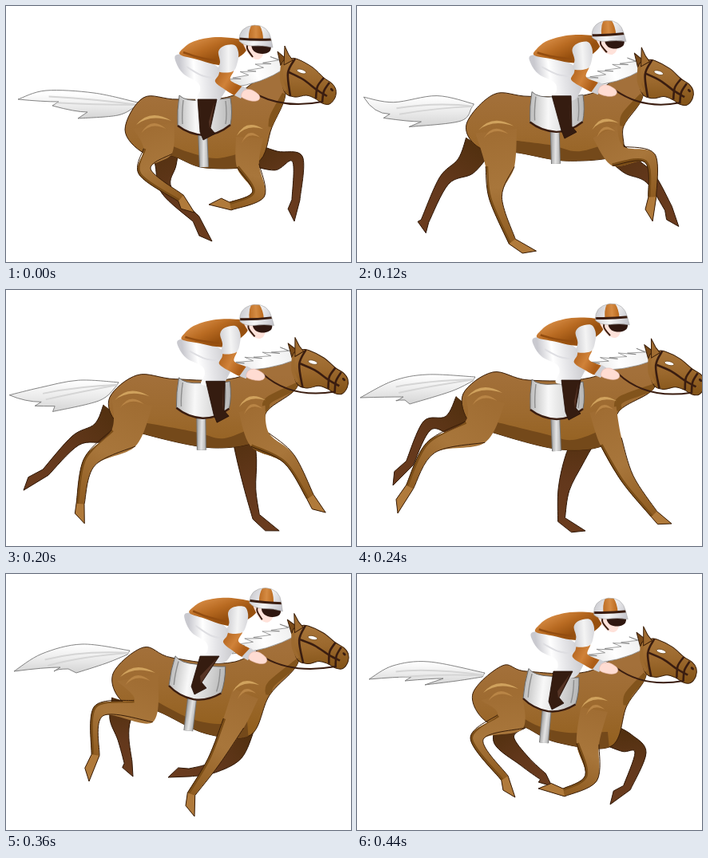
These frames come from a looping animation (432x321 px, 480 ms). An HTML page with a canvas:

```html
<!DOCTYPE html>
<html lang="en">
<head>
<meta charset="utf-8">
<title>Gallop</title>
<style>
html, body { margin: 0; width: 100%; height: 100%; overflow: hidden; background: #fff; }
canvas { display: block; }
</style>
</head>
<body>
<canvas id="stage" width="432" height="321"></canvas>
<script>
const ctx = document.getElementById('stage').getContext('2d');
const STEP = 40, STEPS = 12;
const KEYS = [0, 2, 4, 6, 7, 9, 11];
const INK = '#3a1e08', DARK = '#63381c', STRAP = '#3a1d10';

// One row per key pose, x and y alternating.
// Legs: root, upper joint, hock or knee, fetlock, toe.
const nearHind = [
  [185,150, 190,182, 174,208, 219,241, 236,259],
  [188,165, 203,205, 212,242, 246,293, 276,305],
  [160,145, 153,193, 126,231, 131,286, 155,301],
  [160,135, 148,178, 92,198, 66,247, 51,280],
  [165,130, 150,172, 92,181, 62,231, 43,254],
  [165,130, 172,172, 116,172, 112,227, 104,260],
  [180,150, 192,185, 150,207, 185,256, 198,280]];
const farHind = [
  [200,170, 200,200, 201,231, 238,267, 258,295],
  [168,180, 152,210, 133,227, 137,288, 164,304],
  [140,165, 125,188, 93,207, 48,245, 23,262],
  [138,145, 117,170, 88,170, 66,217, 45,245],
  [148,142, 130,162, 100,161, 84,220, 78,246],
  [150,160, 143,183, 147,207, 153,236, 159,254],
  [195,185, 184,208, 210,235, 233,254, 244,266]];
const nearFore = [
  [305,165, 303,200, 316,236, 281,251, 254,249],
  [312,165, 332,192, 361,202, 353,244, 339,272],
  [308,150, 318,186, 364,190, 377,241, 391,268],
  [308,150, 318,190, 339,237, 372,281, 394,293],
  [305,150, 307,187, 311,236, 313,287, 339,301],
  [300,150, 285,187, 260,235, 232,276, 236,304],
  [297,170, 289,213, 293,256, 259,274, 227,269]];
const farFore = [
  [305,185, 338,194, 365,192, 363,243, 361,270],
  [322,170, 347,186, 376,188, 400,235, 406,258],
  [305,180, 328,214, 347,246, 362,275, 382,297],
  [288,180, 272,213, 259,250, 256,288, 286,302],
  [280,185, 250,221, 225,261, 204,280, 194,301],
  [298,190, 285,224, 258,243, 230,249, 203,255],
  [312,200, 338,212, 355,224, 338,268, 317,289]];
// Withers, chest, brisket, belly, flank, lower and upper buttock, croup, back.
const trunk = [
  [285,112, 333,152, 314,197, 250,203, 208,188, 172,184, 149,155, 172,115, 215,117],
  [300,110, 340,150, 330,190, 265,195, 217,185, 168,187, 146,155, 180,112, 222,117],
  [285,110, 327,152, 324,184, 260,195, 185,183, 140,168, 129,140, 163,109, 210,110],
  [292,110, 328,152, 314,192, 255,200, 168,178, 140,165, 133,130, 170,103, 215,113],
  [298,106, 330,148, 308,197, 240,194, 172,172, 140,163, 133,125, 178,95, 210,105],
  [287,110, 330,152, 306,202, 250,200, 190,172, 146,160, 134,125, 172,92, 208,105],
  [290,122, 338,165, 318,216, 250,211, 205,190, 162,185, 145,150, 182,115, 212,122]];
// Tip, two points on top, root, lower bulge, lobe, notch, second lobe.
const tail = [
  [15,117, 50,106, 110,109, 165,121, 140,137, 90,141, 102,133, 58,125],
  [12,106, 50,112, 105,107, 158,123, 140,139, 78,143, 95,138, 47,131],
  [5,125, 42,127, 95,117, 137,121, 118,147, 55,158, 66,150, 24,148],
  [4,135, 45,114, 88,106, 148,109, 118,127, 66,143, 60,138, 50,139],
  [2,126, 50,106, 95,96, 148,101, 118,117, 70,134, 62,130, 36,132],
  [10,122, 45,100, 95,88, 155,96, 125,112, 88,124, 78,119, 60,122],
  [15,132, 45,115, 90,110, 160,124, 125,134, 85,139, 108,131, 60,134]];
// Rigid parts: x, y, angle.
const head = [[370,82,0], [378,80,0], [378,88,-.03], [391,92,-.05], [392,90,-.08], [384,80,-.07], [381,97,-.04]];
const saddle = [[215,150,0], [223,147,-.04], [210,145,.06], [217,150,0], [207,144,.1], [204,140,.16], [208,156,.13]];
const rider = [[213,62,0], [221,62,-.06], [213,64,-.075], [221,61,-.06], [229,50,.02], [225,50,.055], [219,74,-.06]];
// Knee, then heel of the boot.
const boot = [
  [251,117, 249,163], [256,112, 261,160], [255,114, 262,162], [267,113, 267,158],
  [260,105, 247,146], [254,103, 238,146], [257,122, 246,165]];

// Cyclic cubic interpolation through unevenly spaced keys.
function poseAt(rows, step) {
  const n = KEYS.length;
  let i = n - 1;
  while (KEYS[i] > step) i--;
  const row = k => rows[(k + n) % n];
  const time = k => KEYS[(k + n) % n] + STEPS * Math.floor(k / n);
  const [t0, t1, t2, t3] = [i - 1, i, i + 1, i + 2].map(time);
  const span = t2 - t1, u = (step - t1) / span;
  return row(i).map((a, j) => {
    const b = row(i + 1)[j];
    const m1 = (b - row(i - 1)[j]) / (t2 - t0) * span;
    const m2 = (row(i + 2)[j] - a) / (t3 - t1) * span;
    const c = b - a;
    return a + u * (m1 + u * (3 * c - 2 * m1 - m2 + u * (m1 + m2 - 2 * c)));
  });
}

function pairs(flat) {
  const out = [];
  for (let i = 0; i < flat.length; i += 2) out.push([flat[i], flat[i + 1]]);
  return out;
}

function addSpline(path, pts, closed) {
  const n = pts.length;
  const at = i => closed ? pts[(i + n) % n] : pts[Math.max(0, Math.min(n - 1, i))];
  path.lineTo(...pts[0]);
  for (let i = 0; i < (closed ? n : n - 1); i++) {
    const [a, b, c, d] = [at(i - 1), at(i), at(i + 1), at(i + 2)];
    path.bezierCurveTo(b[0] + (c[0] - a[0]) / 6, b[1] + (c[1] - a[1]) / 6,
      c[0] - (d[0] - b[0]) / 6, c[1] - (d[1] - b[1]) / 6, c[0], c[1]);
  }
  return path;
}

const curve = (flat, closed) => addSpline(new Path2D(), pairs(flat), closed);

function polygon(flat) {
  const path = new Path2D();
  pairs(flat).forEach(p => path.lineTo(...p));
  path.closePath();
  return path;
}

function paint(path, fill, ink, width = 1) {
  if (fill) { ctx.fillStyle = fill; ctx.fill(path); }
  if (ink) { ctx.strokeStyle = ink; ctx.lineWidth = width; ctx.stroke(path); }
}

function ramp(x0, y0, x1, y1, ...colors) {
  const g = ctx.createLinearGradient(x0, y0, x1, y1);
  colors.forEach((c, i) => g.addColorStop(i / (colors.length - 1), c));
  return g;
}

function clipped(path, draw) {
  ctx.save();
  ctx.clip(path);
  draw();
  ctx.restore();
}

function placed([x, y, angle], draw) {
  ctx.save();
  ctx.translate(x, y);
  ctx.rotate(angle);
  draw();
  ctx.restore();
}

function toStage([x, y, angle], px, py) {
  const c = Math.cos(angle), s = Math.sin(angle);
  return [x + px * c - py * s, y + px * s + py * c];
}

function drawLimb(flat, widths, near) {
  const p = pairs(flat), toe = p[4];
  const side = sign => widths.map((w, i) => {
    const a = p[Math.max(0, i - 1)], b = p[i + 1];
    const dx = b[0] - a[0], dy = b[1] - a[1], len = Math.hypot(dx, dy);
    return [p[i][0] - sign * w * dy / len, p[i][1] + sign * w * dx / len];
  });
  const front = side(-1), back = side(1);
  const dx = toe[0] - p[3][0], dy = toe[1] - p[3][1], len = Math.hypot(dx, dy);
  const heel = [toe[0] + (-15 * dx - 9 * dy) / len, toe[1] + (-15 * dy + 9 * dx) / len];
  const trace = first => {
    const path = addSpline(new Path2D(), front.slice(first));
    path.lineTo(...toe);
    path.lineTo(...heel);
    return addSpline(path, back.slice(first).reverse());
  };
  const shape = trace(0);
  if (!near) return paint(shape, ramp(...p[0], ...toe, '#52300f', DARK, '#6b3c1e'), '#2e1606');
  paint(shape, ramp(...p[0], ...p[3], '#a06d33', '#a8763b', '#8f5c21'));
  clipped(shape, () => {
    paint(addSpline(new Path2D(), back.slice(1)), null, '#7a4d17', 6);
    paint(polygon([...front[3], ...toe, ...heel, ...back[3]]), '#b07a3b');
  });
  paint(trace(1), null, INK);
}

function drawGleam(x, y, size, angle) {
  placed([x, y, angle], () => {
    for (const k of [0, 1]) {
      const path = new Path2D(), w = size * (1 - k * .3), top = k * 10;
      path.moveTo(-w, top + 8);
      path.quadraticCurveTo(-w * .2, top - 13, w, top + 3);
      path.quadraticCurveTo(-w * .2, top - 6, -w, top + 8);
      paint(path, k ? '#b98546' : '#d0a25d');
    }
  });
}

function drawTail(flat) {
  const p = pairs(flat), [tip, t1, t2, root, bulge, lobe, notch, lobe2] = p;
  const path = addSpline(new Path2D(), [tip, t1, t2, root]);
  addSpline(path, [[root[0] - 3, root[1] + 5], bulge, lobe]);
  path.lineTo(...notch);
  path.quadraticCurveTo(notch[0] - 15, notch[1], ...lobe2);
  path.lineTo(lobe2[0] + 8, lobe2[1] - 5);
  path.quadraticCurveTo(lobe2[0] - 12, lobe2[1] - 5, ...tip);
  paint(path, ramp(0, t2[1], 0, lobe[1], '#fff', '#ececec', '#d4d4d4'), '#777', .9);
  clipped(path, () => {
    for (const k of [.3, .6]) {
      const strand = new Path2D();
      strand.moveTo(root[0], root[1] + 3);
      strand.quadraticCurveTo(t2[0], t2[1] + 25 * k, t1[0] + 12 * k, t1[1] + 25 * k);
      paint(strand, null, '#d5d5d5', 2);
    }
  });
}

function drawBody(flat, headPose) {
  const p = pairs(flat), [withers, chest, brisket, belly, flank] = p;
  const poll = toStage(headPose, -25, -13), throat = toStage(headPose, -20, 29);
  const path = addSpline(new Path2D(), [withers, poll, throat, ...p.slice(1)], true);
  const top = p[7][1];
  paint(path, ramp(0, top, 0, top + 100, '#a3703a', '#9d6a2f', '#93601f'), INK);
  clipped(path, () => {
    const shade = addSpline(new Path2D(), [
      [flank[0] - 8, flank[1] - 16], [belly[0] - 22, belly[1] - 20],
      [belly[0] + 15, belly[1] - 12], [brisket[0] - 4, brisket[1] - 18]]);
    shade.lineTo(brisket[0], 240);
    shade.lineTo(flank[0] - 8, 240);
    paint(shade, '#74491a');
    paint(addSpline(new Path2D(), [throat, [chest[0] + 2, chest[1] - 14], chest]), null, '#82541c', 9);
  });
}

function drawMane([wx, wy], headPose) {
  const [px, py] = toStage(headPose, -23, -13);
  const ex = wx - 4, ey = wy - 10, spikes = 7;
  const path = new Path2D();
  path.moveTo(px, py);
  for (let i = 0; i < spikes; i++) {
    const a = (i + .75) / spikes, b = (i + .6) / spikes;
    path.lineTo(px + (ex - px) * a - 9, py + (ey - py) * a - 9 + i % 2 * 3);
    path.lineTo(px + (ex - px) * b, py + (ey - py) * b - 4);
  }
  path.lineTo(ex, ey);
  path.quadraticCurveTo((px + ex) / 2 + 6, (py + ey) / 2 + 13, px + 4, py + 8);
  path.closePath();
  paint(path, ramp(ex, ey, px, py, '#dcdcdc', '#fff', '#eee'), '#777', .7);
}

function drawHead() {
  paint(polygon([-26,-7, -30,-25, -17,-14]), '#7a4b1a', INK);
  const face = curve([-22,24, -25,-9, -14,-16, -4,-15, 14,-5, 28,8, 38,15, 43,23, 42,33, 35,41, 26,40, 17,34, 6,30, -9,32], true);
  paint(face, ramp(0, -15, 0, 38, '#a8753a', '#9b682d', '#855519'), INK);
  // Hide the outline where the cheek meets the neck.
  paint(curve([-20,24, -25,10, -24,-8]), null, '#9d6a2f', 4);
  paint(polygon([-22,-8, -21,-32, -16,-21, -11,-14]), '#a06c31', INK);
  const eye = new Path2D();
  eye.ellipse(0, 0, 6, 2.4, .3, 0, 7);
  paint(eye, '#fff', '#6b4316', .8);
  const nostril = new Path2D();
  nostril.ellipse(38, 23, 2.5, 1.5, .8, 0, 7);
  paint(nostril, STRAP);
  for (const strap of [[-8,-16, -17,2, -14,31], [28,8, 20,19, 18,34], [35,14, 28,25, 26,39], [-16,1, 2,10, 19,23, 32,31]])
    paint(curve(strap), null, STRAP, 2.6);
}

function drawSaddle() {
  const girth = curve([31,5, 32,28, 33,52]);
  paint(girth, null, '#777', 12);
  paint(girth, null, ramp(26, 0, 39, 0, '#9a9a9a', '#e4e4e4', '#aaa'), 10);
  const cloth = new Path2D('M2 -38Q10 -30 30 -32Q52 -32 66 -35Q69 -16 66 -1Q50 12 33 12Q14 11 0 0Q-1 -20 2 -38Z');
  paint(cloth, ramp(0, 0, 68, 0, '#bcbcbc', '#f8f8f8', '#d9d9d9', '#b5b5b5'), '#666', .9);
  paint(new Path2D('M0 0Q14 11 33 12Q50 12 66 -1'), null, STRAP, 2.4);
  paint(new Path2D('M7 -32Q5 -15 6 -2M60 -31Q62 -14 60 -2'), null, '#8e8e8e', 1.4);
}

function drawBoot([kx, ky, hx, hy]) {
  paint(polygon([kx - 11,ky, kx + 13,ky, hx + 7,hy - 10, hx + 13,hy - 3, hx - 2,hy + 5, hx - 6,hy - 5]), '#351c10', '#241008', .8);
  paint(polygon([kx + 10,ky + 3, hx + 6,hy - 9, hx + 5,hy - 18]), '#573526');
}

function drawBreeches() {
  paint(curve([214,61, 213,71, 222,85, 240,96, 243,106, 238,119, 262,121, 272,111, 277,97, 267,78, 240,63], true),
    ramp(218, 85, 270, 82, '#c9c9cf', '#fff', '#e5e5e8', '#cfcfd3'));
  paint(curve([226,76, 245,87, 264,91]), null, '#dedee2', 2);
}

function drawTorso() {
  paint(curve([218,61, 222,53, 236,44, 262,39, 290,41, 303,46, 300,57, 289,66, 276,74, 260,73, 239,67], true),
    ramp(235, 42, 248, 72, '#d58a43', '#b96b22', '#97500f'));
  paint(curve([222,58, 240,64, 264,69]), null, '#934d10', 2.5);
  paint(curve([266,87, 262,95, 273,104, 290,113, 298,103, 281,93, 285,80, 270,79], true),
    ramp(264, 85, 290, 100, '#b4651f', '#d08239', '#ad5d17'));
  paint(curve([266,57, 273,50, 286,49, 291,58, 290,70, 284,82, 266,82, 268,70], true),
    ramp(265, 65, 292, 65, '#cfcfd3', '#f4f4f4', '#d6d6da'));
  paint(polygon([286,112, 296,100, 302,104, 294,116]), '#cfcfd4');
  paint(curve([298,106, 307,105, 317,112, 316,118, 307,119, 295,114], true), '#ffdcd2', '#e9b9ad', .6);
}

function drawRiderHead() {
  paint(curve([298,43, 300,54, 307,64, 316,67, 322,61, 324,48], true), '#ffe2da');
  paint(curve([308,49, 311,57, 321,60, 330,57, 331,49, 320,46], true), '#2f1710');
  paint(curve([304,43, 302,53, 309,64]), null, STRAP, 2);
  const cap = new Path2D('M292 44Q291 26 311 24Q329 24 332 42L334 52Q322 49 309 50Q298 50 292 44Z');
  paint(cap, ramp(292, 30, 334, 48, '#c8c8ce', '#f5f5f5', '#c3c3ca'));
  clipped(cap, () => {
    paint(new Path2D('M304 43Q303 31 308 23L317 23Q322 31 322 43Z'), ramp(303, 0, 323, 0, '#bb6b22', '#d58b43', '#b66417'));
    paint(new Path2D('M291 41Q311 43 333 42'), null, STRAP, 3);
  });
  paint(cap, null, '#aaa', .6);
}

function drawReins(headPose, riderPose) {
  const [bx, by] = toStage(headPose, 26, 38), [hx, hy] = toStage(riderPose, 103, 50);
  const rein = new Path2D();
  rein.moveTo(hx, hy);
  rein.quadraticCurveTo(hx + 35, Math.max(hy, by) + 9, bx, by);
  paint(rein, null, STRAP, 2);
}

function draw(step) {
  const now = rows => poseAt(rows, step);
  const h = now(head), r = now(rider), s = now(saddle), t = now(trunk);
  const hind = now(nearHind), fore = now(nearFore);
  const onRider = part => placed(r, () => { ctx.translate(-213, -62); part(); });

  ctx.fillStyle = '#fff';
  ctx.fillRect(0, 0, 432, 321);
  ctx.lineJoin = 'round';
  drawTail(now(tail));
  drawLimb(now(farHind), [18, 13, 7, 5], false);
  drawLimb(now(farFore), [14, 12, 7, 5], false);
  drawBody(t, h);
  drawLimb(hind, [26, 18, 8, 5], true);
  drawLimb(fore, [17, 14, 8, 5], true);
  drawGleam(hind[0], hind[1] - 9, 22, 0);
  drawGleam(fore[0], fore[1] - 12, 17, -.1);
  drawMane(t, h);
  placed(h, drawHead);
  placed(s, drawSaddle);
  onRider(drawBreeches);
  drawBoot(now(boot));
  drawReins(h, r);
  onRider(() => { drawTorso(); drawRiderHead(); });
}

function frame() {
  draw(Math.floor(performance.now() / STEP) % STEPS);
  requestAnimationFrame(frame);
}
frame();
</script>
</body>
</html>
```
